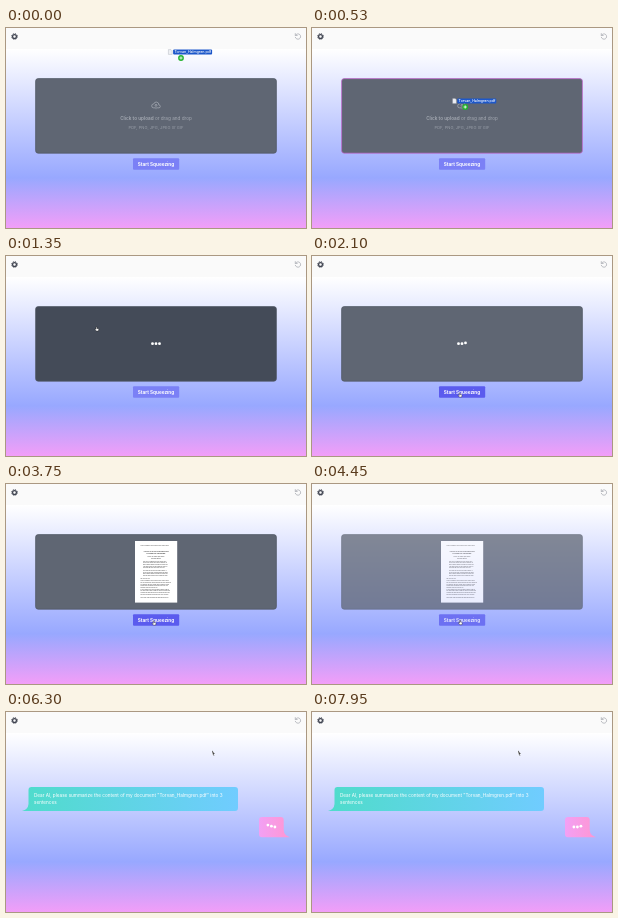
An HTML page that plays this animation: 300x200 px, repeating every 8 s.

```html
<!DOCTYPE html>
<html lang="en">
<head>
<meta charset="utf-8">
<title>Document upload</title>
<style>
  html, body { margin: 0; width: 100%; height: 100%; overflow: hidden; background: #fafafa; }
  svg { display: block; width: 100vw; height: 100vh; font-family: Inter, sans-serif; }
  .mid { text-anchor: middle; }
  .bold { font-weight: 700; }
  #page { font: 1.35px "Noto Serif", serif; fill: #333; }
</style>
</head>
<body>
<svg viewBox="0 0 300 200" preserveAspectRatio="none">
  <defs>
    <linearGradient id="sky" x2="0" y2="1">
      <stop offset="0" stop-color="#fff"/>
      <stop offset=".72" stop-color="#98a8ff"/>
      <stop offset="1" stop-color="#f29ef8"/>
    </linearGradient>
    <linearGradient id="teal">
      <stop offset="0" stop-color="#4fdccb"/>
      <stop offset="1" stop-color="#70ccff"/>
    </linearGradient>
    <linearGradient id="rose">
      <stop offset="0" stop-color="#f2a0f4"/>
      <stop offset="1" stop-color="#ff96d2"/>
    </linearGradient>
  </defs>

  <rect width="300" height="200" fill="#fafafa"/>
  <rect y="21" width="300" height="179" fill="url(#sky)"/>

  <g transform="translate(8.5 8.5)" fill="none" stroke="#3f4350">
    <circle r="1.9" stroke-width="1.3"/>
    <circle r="2.9" stroke-width="1" stroke-dasharray="1.14 1.14"/>
  </g>
  <g fill="none" stroke="#a3a5ac" stroke-width=".7" stroke-linecap="round" stroke-linejoin="round">
    <path d="M289.6 7.1A2.7 2.7 0 1 1 289.3 9.3"/>
    <path d="M289.3 5.6V7.5H291.2"/>
  </g>

  <g id="form">
    <rect id="zone" x="29.6" y="50.6" width="240.8" height="74.6" rx="2.6" stroke-width=".7"/>
    <g id="prompt">
      <path transform="translate(145.2 73.6) scale(.48)" fill="none" stroke="#a4a9b2" stroke-width="1.6" stroke-linecap="round" stroke-linejoin="round"
        d="M13 13h3a3 3 0 0 0 0-6h-.03A5.5 5.5 0 0 0 5.2 5H5a4 4 0 0 0 0 8h2.2M10 15V6m0 0L8 8m2-2 2 2"/>
      <text class="mid" x="150" y="92.4" font-size="4.67" fill="#a6abb4"><tspan font-weight="600">Click to upload</tspan> or drag and drop</text>
      <text class="mid" x="150" y="101" font-size="4.1" fill="#989ea8">PDF, PNG, JPG, JPEG or GIF</text>
    </g>
    <g id="loader" fill="#fff"></g>
    <g id="page"><rect x="129" y="57" width="42.2" height="61.6" fill="#fff"/></g>
    <rect id="button" x="127" y="130.3" width="46.2" height="11.4" rx="1"/>
    <text class="mid bold" x="150" y="137.7" font-size="4.67" fill="#fff">Start Squeezing</text>
  </g>

  <g id="gauge" fill="none" stroke-width="2.9">
    <circle cx="150" cy="91.5" r="20.9" stroke="#34363f"/>
    <circle id="arc" cx="150" cy="91.5" r="20.9" stroke="#ee66ea" pathLength="100" transform="rotate(-90 150 91.5)"/>
    <g class="mid" fill="#fff" stroke="none">
      <text x="150" y="84.7" font-size="3.6">Parsing</text>
      <text x="150" y="89.2" font-size="3.6">document</text>
      <text id="percent" class="bold" x="150" y="100" font-size="7.3"></text>
    </g>
  </g>

  <g id="chat">
    <path fill="url(#teal)" d="M25.5 75H229a3 3 0 0 1 3 3V96a3 3 0 0 1-3 3H16Q22 97.5 22.5 92V78a3 3 0 0 1 3-3Z"/>
    <g font-size="4.65" fill="#fff">
      <text x="28" y="85.1">Dear AI, please summarize the content of my document "Torvan_Halmgren.pdf" into 3</text>
      <text x="28" y="92.1">sentences</text>
    </g>
    <path fill="url(#rose)" d="M256 105H274.7a3 3 0 0 1 3 3V118Q278 123.5 284 125.2H256a3 3 0 0 1-3-3V108a3 3 0 0 1 3-3Z"/>
    <g id="typing" fill="#fff"></g>
  </g>

  <g id="file">
    <path d="M-3.8-2.4H-1.2L0-1.2V2.4H-3.8Z" transform="translate(-.6 0)" fill="#eef0f4" stroke="#8d919b" stroke-width=".3"/>
    <rect x=".3" y="-2.5" width="39" height="5" rx="1" fill="#1d57c9"/>
    <text x="1.6" y="1.25" font-size="3.55" font-weight="500" fill="#fff">Torvan_Halmgren.pdf</text>
    <circle cx="8.2" cy="6" r="2.9" fill="#24b32f"/>
    <path d="M6.6 6H9.8M8.2 4.4V7.6" stroke="#fff" stroke-width=".8"/>
  </g>

  <g id="cursor" stroke-width=".45" stroke-linejoin="round">
    <path id="hand" fill="#fff" stroke="#222" d="M-.7-2Q-.2-2.5.2-2V-.5L1.6-.2Q2.2 0 2 .8L1.5 2.2H-.5L-1.8.5Q-1.9-.2-.7.3Z"/>
    <path id="arrow" fill="#111" stroke="#fff" stroke-width=".3" d="M0-1.6V3L1-.0L1 2.2L1.7 3.7L2.4 3.4L1.7 1.9H3Z"/>
  </g>
</svg>

<script>
const LOOP = 8000;
const NS = 'http://www.w3.org/2000/svg';
const $ = id => document.getElementById(id);

function add(parent, tag, attrs, text = '') {
  const el = document.createElementNS(NS, tag);
  for (const k in attrs) el.setAttribute(k, attrs[k]);
  el.textContent = text;
  parent.append(el);
  return el;
}

const ramp = (t, a, b) => Math.min(1, Math.max(0, (t - a) / (b - a)));
const ease = u => u * u * (3 - 2 * u);
const mix = (a, b, u) => a + (b - a) * u;
const blend = (a, b, u) => `rgb(${a.map((v, i) => Math.round(mix(v, b[i], u)))})`;
const fade = (id, v) => $(id).setAttribute('opacity', v);
const move = (id, [x, y]) => $(id).setAttribute('transform', `translate(${x} ${y})`);

// Point on a list of [ms, x, y] stops, eased between neighbours
function along(stops, t) {
  let i = 0;
  while (i < stops.length - 2 && t >= stops[i + 1][0]) i++;
  const [a, ax, ay] = stops[i], [b, bx, by] = stops[i + 1];
  const u = ease(ramp(t, a, b));
  return [mix(ax, bx, u), mix(ay, by, u)];
}

const makeDots = (id, x, y) => [-1, 0, 1].map(i =>
  add($(id), 'circle', { cx: x + i * 3.5, cy: y, r: 1.4 }));

// Each dot hops for 600 ms, 100 ms after the one before; the row rests 250 ms
function bounce(dots, t, start) {
  const phase = ((t - start) % 1050 + 1050) % 1050;
  dots.forEach((dot, i) => {
    const u = ramp(phase, i * 100, i * 100 + 600);
    dot.setAttribute('transform', `translate(0 ${-10.4 * u * (1 - u)})`);
  });
}

function buildPage() {
  const page = $('page');
  const words = 'the cost of a plan is set by those who own it and by all who work on its terms in each case '.repeat(3);
  const line = (y, x, chars, from) =>
    add(page, 'text', { x, y }, words.slice(from, from + chars).trim());
  const mid = (y, text, extra) => add(page, 'text', { x: 150, y, class: 'mid', ...extra }, text);
  line(61.7, 134.5, 46, 4);
  mid(68.4, 'A STUDY OF PLANS AND THEIR COST', { 'font-weight': 700 });
  mid(70.3, 'IN WORK AND OWNERSHIP', { 'font-weight': 700 });
  mid(72.7, 'Notes on terms and shares');
  mid(74.6, 'Revised edition', { 'font-style': 'italic' });
  for (let i = 0; i < 5; i++) line(77.6 + i * 1.65, 137, 38, i * 17);
  for (let i = 0; i < 4; i++) line(87 + i * 1.65, 137, 38, i * 13 + 9);
  line(95, 134.5, 16, 0);
  for (let i = 0; i < 9; i++) line(97.4 + i * 1.65, 134.5, i === 4 ? 28 : 46, i * 19 + 3);
  line(114.2, 134.5, 42, 30);
}

const FILE_PATH = [[0, 166.8, 24], [530, 145, 73], [580, 144.6, 73.4]];
const CURSOR_PATH = [
  [730, 152, 77], [1080, 90, 72], [1300, 90, 72], [2050, 148, 139],
  [4420, 148, 139], [5200, 206, 40]
];
const SLATE = [95, 102, 115], DARK = [68, 75, 88];
const EDGE = [78, 85, 98], PINK = [196, 100, 208];
const SOFT = [123, 128, 246], DEEP = [91, 91, 238];

const loader = makeDots('loader', 150, 87.7);
const typing = makeDots('typing', 265.4, 115);
buildPage();

function render(t) {
  const formOn = 1 - ramp(t, 4400, 4600);
  fade('form', formOn);
  fade('prompt', t < 730 ? 1 : 0);
  fade('loader', t < 730 ? 0 : 1 - ramp(t, 3480, 3600));
  fade('page', ramp(t, 3470, 3750));

  const dark = ramp(t, 730, 880) - ramp(t, 1830, 2000);
  const over = ramp(t, 230, 330) - ramp(t, 730, 880);
  $('zone').setAttribute('fill', blend(SLATE, DARK, dark));
  $('zone').setAttribute('stroke', blend(EDGE, PINK, over));
  $('button').setAttribute('fill', blend(SOFT, DEEP, ramp(t, 1890, 2040)));
  bounce(loader, t, 300);

  fade('file', t < 580 ? 1 : 0);
  move('file', along(FILE_PATH, t));
  fade('cursor', t < 730 ? 0 : 1);
  move('cursor', along(CURSOR_PATH, t));
  fade('hand', t < 4500 ? 1 : 0);
  fade('arrow', t < 4500 ? 0 : 1);

  const done = Math.min(100, Math.max(0, 41 + (t - 5250) * .0675));
  fade('gauge', ramp(t, 4550, 4700) - ramp(t, 6100, 6200));
  $('arc').setAttribute('stroke-dasharray', `${done} 200`);
  $('percent').textContent = Math.floor(done) + '%';

  fade('chat', ramp(t, 6110, 6260));
  bounce(typing, t, 6150);
}

const start = performance.now();
function tick() {
  render((performance.now() - start) % LOOP);
  requestAnimationFrame(tick);
}
tick();
</script>
</body>
</html>
```
